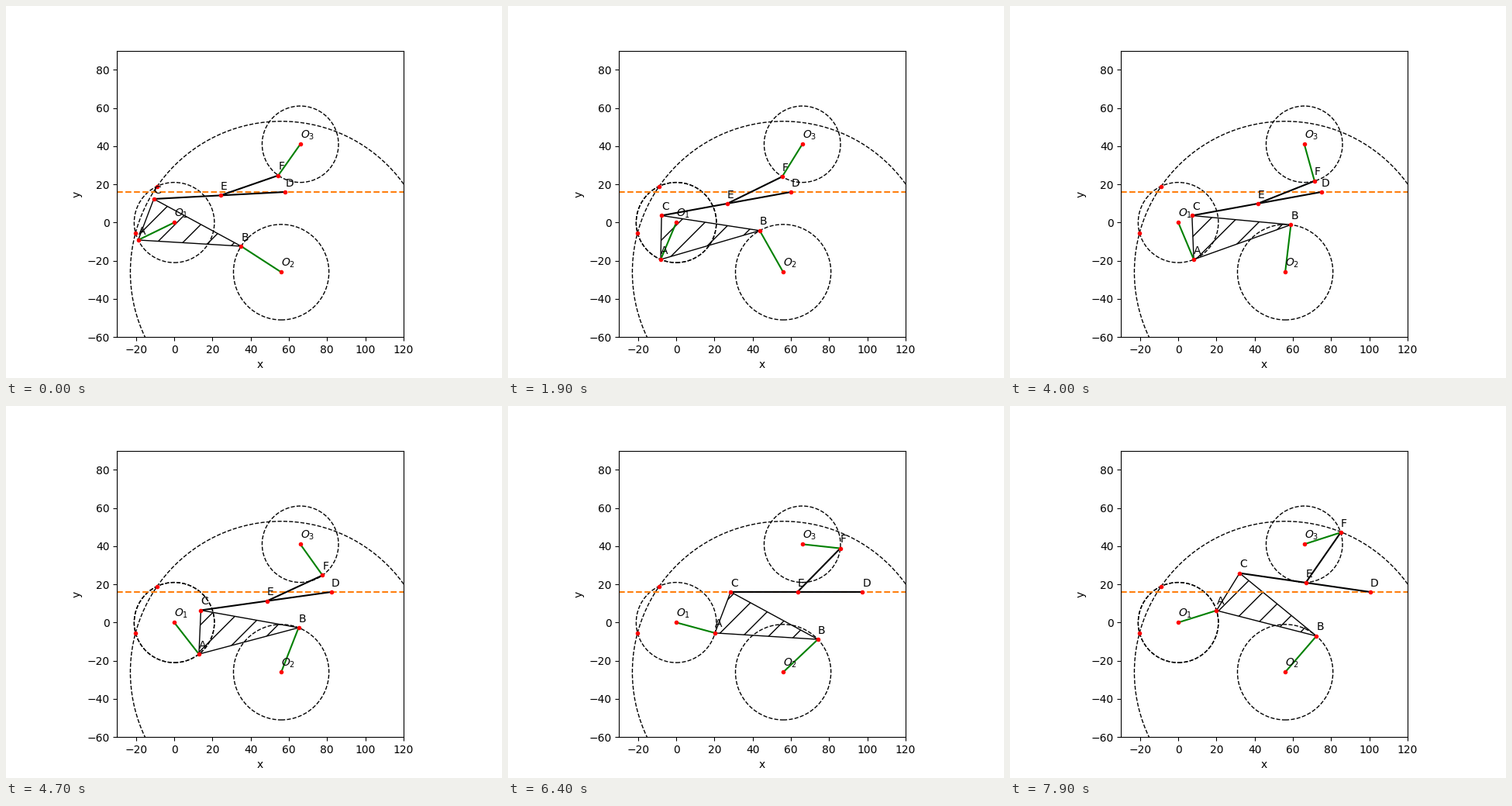
A matplotlib script for the animation above (8 s loop, 640 by 480 pixels).

```python
import numpy as np
import matplotlib.pyplot as plt
from matplotlib.animation import FuncAnimation
from matplotlib.patches import Circle, Polygon

O1, O2, O3 = np.array([0, 0]), np.array([56, -26]), np.array([66, 41])
R1, R2, R3 = 21, 25, 20
AB, AC, BC = 54, 23, 52
CD, CE, EF = 69, 35, 32
RAIL = 16
FRAMES, STEPS, FIRST = 80, 130, 5


def meet(p, rp, q, rq, side=1):
    """Intersection of two circles; side=1 lies left of p -> q."""
    d = q - p
    dist = np.hypot(*d)
    u = d / dist
    a = (rp**2 - rq**2 + dist**2) / (2 * dist)
    h = np.sqrt(max(rp**2 - a**2, 0))
    return p + a * u + side * h * np.array([-u[1], u[0]])


# Dead points of the crank: coupler and rocker in one line
stops = [meet(O1, R1, O2, R2 + AB, s) for s in (1, -1)]
hi, lo = (np.arctan2(p[1], p[0]) % (2 * np.pi) for p in stops)
angles = np.linspace(lo, hi + 2 * np.pi, STEPS)


def solve(phi):
    a = R1 * np.array([np.cos(phi), np.sin(phi)])
    b = meet(a, AB, O2, R2)
    c = meet(a, AC, b, BC)
    d = np.array([c[0] + np.sqrt(CD**2 - (RAIL - c[1])**2), RAIL])
    e = c + (d - c) * CE / CD
    f = meet(e, EF, O3, R3, -1)
    return dict(A=a, B=b, C=c, D=d, E=e, F=f)


fig, ax = plt.subplots(figsize=(6.4, 4.8), dpi=100)
ax.set_aspect("equal")
ax.set(xlim=(-30, 120), ylim=(-60, 90), xlabel="x", ylabel="y")


def ring(center, r):
    return ax.add_patch(Circle(center, r, fill=False, ls="--"))


def label(text, p):
    return ax.text(p[0], p[1] + 3, text)


def link(color):
    return ax.plot([], [], color=color)[0]


for center, r in ((O1, R1), (O2, R2), (O2, R2 + AB), (O3, R3)):
    ring(center, r)
crank_ring = ring(O1, R1)
ax.plot([-30, 120], [RAIL, RAIL], "--", color="tab:orange")

plate = ax.add_patch(Polygon(np.zeros((3, 2)), fill=False, hatch="/"))
rods = [link("black") for _ in range(2)]
cranks = [link("green") for _ in range(3)]
fixed = np.array([O1, O2, O3, *stops])
ax.plot(fixed[:, 0], fixed[:, 1], "r.", zorder=3)
joints = ax.plot([], [], "r.", zorder=3)[0]

for i, p in enumerate((O1, O2, O3), 1):
    label(f"$O_{i}$", p)
names = {k: label(k, (0, 0)) for k in "ABCDEF"}


def update(i):
    pos = solve(angles[FIRST + i])
    a, b, c, d, e, f = pos.values()
    plate.set_xy([a, b, c])
    ends = ((c, d), (e, f), (O1, a), (O2, b), (O3, f))
    for line, pair in zip(rods + cranks, ends):
        line.set_data(*np.transpose(pair))
    joints.set_data(*np.transpose(list(pos.values())))
    for k, t in names.items():
        t.set_position((pos[k][0], pos[k][1] + 3))
    crank_ring.set_visible(i % 2 == 1)
    return [plate, *rods, *cranks, joints, *names.values(), crank_ring]


anim = FuncAnimation(fig, update, frames=FRAMES, interval=100,
                     repeat=True, repeat_delay=0)
plt.show()
```
